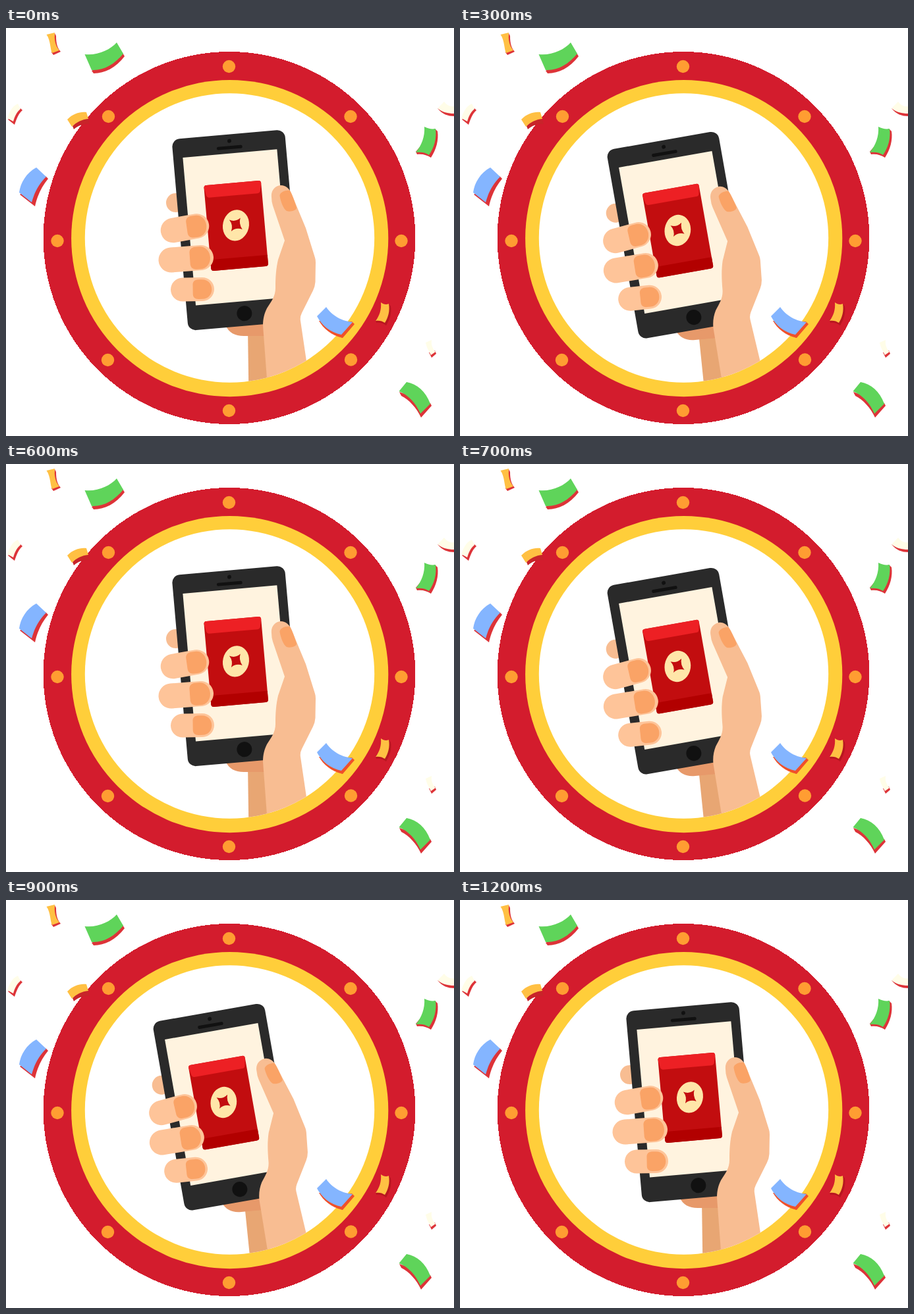
An HTML page that plays this animation: 680x620 px, repeating every 1300 ms.

```html
<!DOCTYPE html>
<html lang="en">
<head>
<meta charset="utf-8">
<title>Red envelope</title>
<style>
  html, body { margin: 0; width: 100%; height: 100%; overflow: hidden; background: #fff; }
  svg { display: block; width: 680px; height: 620px; }
  .green { fill: #5fd45a; }
  .blue { fill: #84b5ff; }
  .gold { fill: #ffc043; }
  .cream { fill: #fffde8; }
  .edge { fill: #dd3338; }
  .finger { stroke: #fec499; stroke-linecap: round; }
  .nail { fill: #faa366; }
</style>
</head>
<body>
<svg viewBox="0 0 680 620" xmlns="http://www.w3.org/2000/svg">
  <defs>
    <clipPath id="window"><circle cx="339.5" cy="319" r="219.7"/></clipPath>
    <path id="nail" d="M-6 -16.5 H0 C9 -16.5 15 -9 15 0 S9 16.5 0 16.5 H-6 C-12 16.5 -15 13 -15 8 V-8 C-15 -13 -12 -16.5 -6 -16.5Z"/>
  </defs>

  <ellipse cx="339" cy="319" rx="282.4" ry="283" fill="#d31c2d" shape-rendering="crispEdges"/>
  <circle cx="339.7" cy="319.6" r="240.6" fill="#ffce3a"/>
  <circle cx="339.5" cy="319" r="219.7" fill="#fff"/>
  <g id="bulbs" fill="#ff9d32"></g>

  <g clip-path="url(#window)">
    <g id="hand">
      <path fill="#e8a673" d="M367 455 H400 V560 H368.500Z"/>
      <path fill="#e7996a" d="M333 452 C339 463 347 468 361 468 H394 V440Z"/>
      <circle cx="257.5" cy="265.5" r="14.5" fill="#f8bd92"/>

      <g transform="translate(349.8 307.2) rotate(-5)">
        <rect x="-86" y="-146" width="172" height="292" rx="12" fill="#2a2a2a"/>
        <rect x="-71.5" y="-117" width="143.5" height="225.5" fill="#fff3df"/>
        <g fill="#111">
          <circle cx="1" cy="-136" r="3"/>
          <rect x="-19" y="-128.500" width="39" height="5" rx="2.5"/>
          <circle cx="1" cy="127" r="11.5"/>
        </g>
        <rect x="-43.5" y="-72" width="87" height="130.5" rx="4" fill="#c20d0f"/>
        <path fill="#b20000" d="M-43.5 41.5 H43.5 V54.5 Q43.5 58.5 39.5 58.5 H-39.5 Q-43.5 58.5 -43.5 54.5Z"/>
        <path fill="#ed2024" d="M-39.5 -72 H39.5 Q43.5 -72 43.5 -68 L41 -56 Q40 -53 37 -53 H-37 Q-40 -53 -41 -56 L-43.5 -68 Q-43.5 -72 -39.5 -72Z"/>
        <ellipse rx="19.8" ry="23.8" transform="translate(-.2 -7.4) rotate(18)" fill="#ffe6a9"/>
        <path fill="#c20d0f" d="M-9.5 -16.500 Q-.5 -12 7.5 -18 Q4 -9 9 -.5 Q-.5 -4.500 -8 1 Q-4 -8 -9.5 -16.500Z"/>
      </g>

      <path fill="#f8bd92" d="M403 257 C402 247 408 240 417 239 C425 239 430 244 433 251 L455 304 L469 349 Q470 352 470 356 L469.500 386 Q469 393 466 399 L449 433 Q446 439 447 445 L456 506 L462 550 L398 560 L390 452 C390 442 392 434 396 426 C403 415 409 408 409 395 C409 378 410 365 413 352 L423 323 L405 270 Q403 264 403 257Z"/>
      <path class="nail" d="M415.500 255 C415 250 424 246 431 247 C434 252 438 263 441 273 C441 277 432 280 426 278 C421 275 417 264 415.500 255Z"/>

      <path class="finger" stroke-width="37.5" d="M253.5 307.5 L289.5 301"/>
      <use href="#nail" class="nail" transform="translate(289.3 301.3) rotate(-8)"/>
      <path class="finger" stroke-width="38" d="M250.5 352.5 L296 349"/>
      <use href="#nail" class="nail" transform="translate(294.5 349.3) rotate(-4) scale(1.03)"/>
      <path class="finger" stroke-width="36" d="M268 397.5 L298 397"/>
      <use href="#nail" class="nail" transform="translate(298 397) rotate(-1) scale(.96 .9)"/>
    </g>
  </g>

  <g id="confetti">
    <path class="edge" d="M74 8 L76 12 C76 24 78 30 83 36 L72 41 L69 37Z"/>
    <path class="gold" d="M61.500 10 L74 7 C73 18 75 27 81 34 L70 38 C67 33 68 19 61.500 10Z"/>

    <path class="edge" d="M130 65 L177 38 L180 43 C167 60 150 69 133 69Z"/>
    <path class="green" d="M119.500 40 C140 42 158 33 168 22 L178 39 C165 55 148 65 130 64Z"/>

    <path class="edge" d="M22 122 L25 125 C19 130 16 138 13 147 L3 139Z"/>
    <path class="cream" d="M18 115 L22 123 C16 128 13 135 11 142 L2 137 C5 128 9 119 18 115Z"/>

    <path fill="#c8242a" d="M101 149 C107 142 116 138 124 136 L127 146 C118 145 110 148 103 154Z"/>
    <path class="gold" d="M93 139 C102 130 112 127 122 128 L125 138 C115 139 107 143 100 150Z"/>

    <path class="edge" d="M60 225 L64 229 C54 241 47 256 44 271 L21 253Z"/>
    <path class="blue" d="M46 212 L61 226 C50 237 43 250 39 265 L20 250 C22 235 31 220 46 212Z"/>

    <path class="edge" d="M655 122 L680 129 V134 C671 134 662 131 655 122Z"/>
    <path class="cream" d="M665 112 C669 117 674 120 680 119 V130 C671 130 662 128 655 122Z"/>

    <path class="edge" d="M651 153 L655 157 C657 170 653 185 645 197 C639 193 632 191 624 192 L622 188Z"/>
    <path class="green" d="M635 150 C641 153 646 154 652 153 C654 167 650 182 642 193 C637 189 630 188 622 189 C631 178 636 165 635 150Z"/>

    <path fill="#f0502a" d="M525 446 L529 450 L511 471 C494 467 482 457 475 445Z"/>
    <path class="blue" d="M486 424 C494 436 508 445 526 447 L509 466 C493 463 479 452 472 438Z"/>

    <path fill="#b81620" d="M581 419 L584 423 C586 433 582 444 577 452 C572 448 567 447 562 448 L561 444Z"/>
    <path class="gold" d="M569 417 C573 420 577 421 581 419 C583 430 580 440 575 448 C571 445 566 444 561 445 C567 437 570 428 569 417Z"/>

    <path class="edge" d="M651 490 L653 495 L646 501 L642 493Z"/>
    <path class="cream" d="M637 478 L646 474 C645 482 648 488 652 492 L645 497 C642 491 638 485 637 478Z"/>

    <path class="edge" d="M644 570 L646 574 L630 592 C623 577 612 565 600 559 L597 553Z"/>
    <path class="green" d="M608 538 C624 541 637 552 644 571 L629 586 C622 570 611 558 596.500 552Z"/>
  </g>
</svg>
<script>
  const LOOP = 1300, STEP = 100;
  const hand = document.getElementById('hand');
  const bulbs = [
    [338.5, 58.5], [523, 134.5], [600, 323.5], [523.5, 504],
    [338.5, 581.5], [154.5, 504.5], [78, 323.5], [155.5, 134.5]
  ];
  document.getElementById('bulbs').innerHTML =
    bulbs.map(([x, y]) => `<circle cx="${x}" cy="${y}" r="9.7"/>`).join('');

  // The hand snaps between two poses, pivoting at the wrist.
  function render(ms) {
    const tilted = Math.floor((ms % LOOP) / STEP) % 2 === 1;
    hand.setAttribute('transform', `rotate(${tilted ? -5 : 0} 427 517)`);
  }

  const start = performance.now();
  function tick() {
    render(performance.now() - start);
    requestAnimationFrame(tick);
  }
  tick();
</script>
</body>
</html>
```
